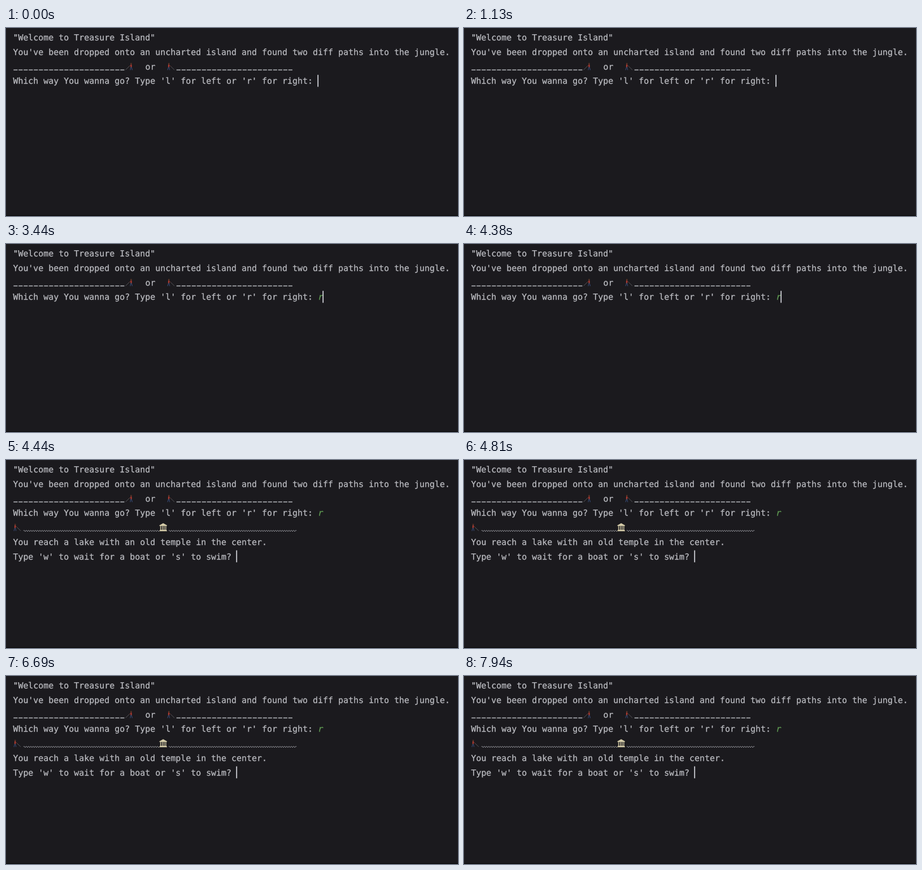
An HTML page for the animation above (8000 ms loop, 800 px wide and 334 px high).

```html
<!DOCTYPE html>
<html lang="en">
<head>
<meta charset="utf-8">
<title>Island adventure</title>
<style>
  html, body { margin: 0; width: 100%; height: 100%; overflow: hidden; background: #1b1a1e; }
  svg { display: block; width: 100%; height: 100%; }
  text {
    font: 14.95px "DejaVu Sans Mono", "Noto Sans Mono", monospace;
    fill: #bcbdc2; stroke: #bcbdc2; stroke-width: .25; white-space: pre;
    text-rendering: geometricPrecision; font-variant-ligatures: none;
  }
  .input { fill: #629f55; stroke: #629f55; font-style: italic; }
  .caret { fill: #ced0d6; }
  .dashes { stroke: #b9babf; stroke-width: 1.3; stroke-dasharray: 7.2 1.8; }
  .wave { fill: none; stroke: #a2a2a7; stroke-width: .9; }
</style>
</head>
<body>
<svg id="stage" viewBox="0 0 800 334">
  <defs>
    <g id="walker">
      <path d="M7.4 7.2 1 13.4" stroke="#707075" stroke-width=".7"/>
      <path d="M10.6 8 9.2 13.8M11.2 8 13 13.8" stroke="#34456b" stroke-width="1.2"/>
      <path d="M9.8 3.7h2.2l.2 4.7H9.8z" fill="#a83a30"/>
      <path d="M10.2 4.6 7.4 7.2" stroke="#8c3a30" stroke-width=".9"/>
      <circle cx="10.8" cy="2.1" r="1.3" fill="#70402f"/>
      <path d="M9.5 1.6a1.3 1.3 0 0 1 2.5 .5z" fill="#2b1d1b"/>
    </g>
    <g id="temple" fill="#d6cda9">
      <path d="M7.5 0 14.2 3.8v1.2H.8V3.8z"/>
      <path d="M2.9 5v7M6 5v7M9 5v7M12.1 5v7" stroke="#d6cda9" stroke-width="1.4"/>
      <path d="M1.6 11.8h11.8v1h.8v1.5H.8v-1.5h.8z"/>
    </g>
  </defs>
  <rect width="800" height="334" fill="#1b1a1e"/>
  <rect y="332.6" width="800" height="1.4" fill="#0b0b0d"/>
</svg>
<script>
const LOOP = 8000, LEFT = 12.4, CELL = 9, BASE = 22, LINE = 25.75;
const stage = document.getElementById('stage');

function add(tag, attrs, parent = stage, content = '') {
  const el = document.createElementNS('http://www.w3.org/2000/svg', tag);
  for (const key in attrs) el.setAttribute(key, attrs[key]);
  el.textContent = content;
  return parent.appendChild(el);
}

const colX = col => LEFT + col * CELL;
const write = (row, col, str, parent, cls = '') =>
  add('text', { x: colX(col), y: BASE + row * LINE, class: cls }, parent, str);
const place = (id, transform, parent) => add('use', { href: '#' + id, transform }, parent);
const caret = (row, col) =>
  add('rect', { class: 'caret', x: colX(col) - 1.1, y: 6 + row * LINE, width: 1.8, height: 21.2 });
const dashes = (x, count) =>
  add('path', { class: 'dashes', d: `M${x + .9} 74.5h${count * CELL - 1.8}` });
const wave = (x, end, parent) =>
  add('path', { class: 'wave', d: `M${x} 125.9q1 -2.4 2 0` + 't2 0'.repeat((end - x) / 2 - 1) }, parent);

// Visible only within the given [start, end) spans of the loop.
function during(el, ...spans) {
  const frames = [{ offset: 0, opacity: spans[0][0] === 0 ? 1 : 0 }];
  for (const [start, end] of spans) {
    if (start > 0) frames.push({ offset: start / LOOP, opacity: 1 });
    if (end < LOOP) frames.push({ offset: end / LOOP, opacity: 0 });
  }
  frames.push({ offset: 1, opacity: frames[frames.length - 1].opacity });
  for (const frame of frames) frame.easing = 'steps(1, end)';
  el.animate(frames, { duration: LOOP, iterations: Infinity }).startTime = 0;
}

write(0, 0, '"Welcome to Treasure Island"');
write(1, 0, "You've been dropped onto an uncharted island and found two diff paths into the jungle.");
dashes(LEFT, 22);
place('walker', 'translate(210.6 61)');
write(2, 26, 'or');
place('walker', 'translate(299 61) scale(-1 1)');
dashes(300.8, 23);
write(3, 0, "Which way You wanna go? Type 'l' for left or 'r' for right:");

const TYPED = 3310, ENTER = 4440;
const answer = write(3, 60, 'r', stage, 'input');
const lake = add('g', {});
place('walker', 'translate(27 112.4) scale(-1 1)', lake);
wave(31, 271, lake);
place('temple', 'translate(270.7 112.2)', lake);
wave(288, 514, lake);
write(5, 0, 'You reach a lake with an old temple in the center.', lake);
write(6, 0, "Type 'w' to wait for a boat or 's' to swim?", lake);

during(answer, [TYPED, LOOP]);
during(lake, [ENTER, LOOP]);
during(caret(3, 60), [0, 440], [1000, 1500], [2000, 2500], [3000, TYPED]);
during(caret(3, 61), [TYPED, 3810], [4310, ENTER]);
during(caret(6, 44), [ENTER, 5000], [5500, 6000], [6500, 7060], [7560, LOOP]);
</script>
</body>
</html>
```
